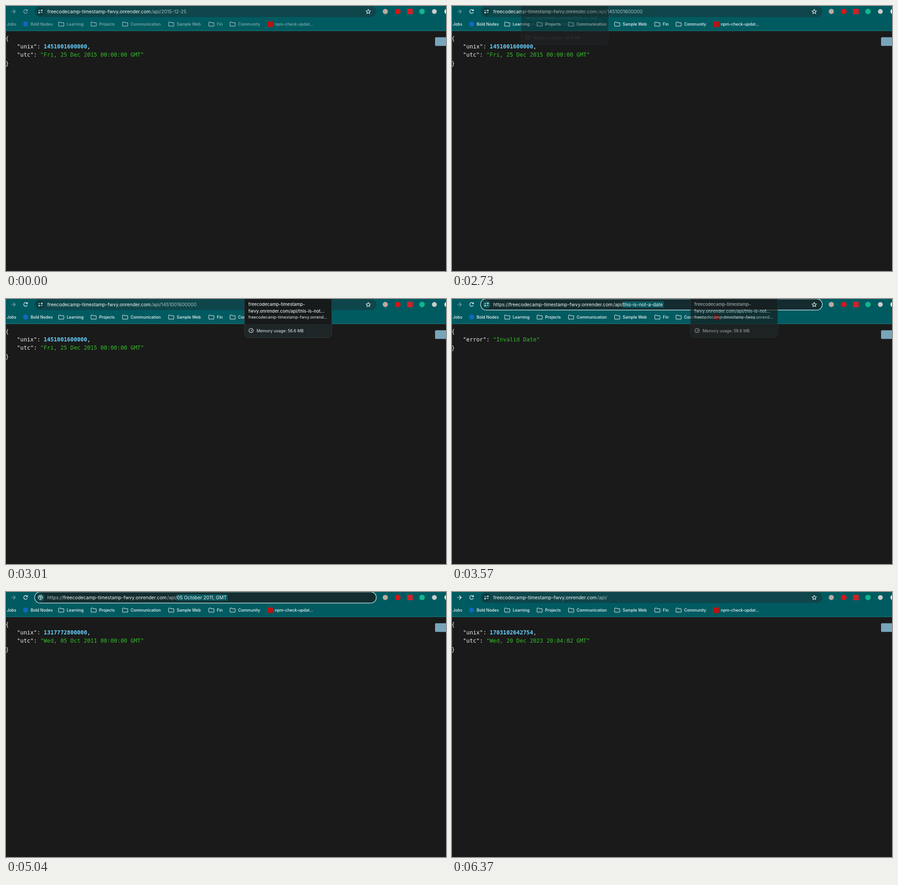
Recreate the animation shown at these times as an HTML page. Size 964x581 px, loop 8750 ms.

```html
<!DOCTYPE html>
<html lang="en">
<head>
<meta charset="utf-8">
<title>Timestamp API</title>
<style>
  html, body { margin: 0; width: 100%; height: 100%; overflow: hidden; background: #1a1a1a; }
  svg { display: block; }
  text { white-space: pre; font-family: Inter, sans-serif; }
  .url text { font-size: 10.35px; }
  .marks text { font-size: 8.8px; font-weight: 500; }
  .json text { font: 12.17px "DejaVu Sans Mono", monospace; fill: #f2f2f2; }
  .num { fill: #66d1ff; font-weight: bold; }
  .str { fill: #35bd2c; }
  .line { fill: none; stroke: currentColor; stroke-width: 1.2; stroke-linecap: round; stroke-linejoin: round; }
</style>
</head>
<body>
<svg id="stage" width="964" height="581" viewBox="0 0 964 581">
  <rect width="964" height="581" fill="#1a1a1a"/>
  <rect width="964" height="55" fill="#005b61"/>
  <path d="M0 54.5H964" stroke="#1b757a"/>
  <path id="forward" class="line" d="M12 12h8M16.3 8l4 4-4 4"/>
  <path id="reload" class="line" d="M46.6 14a4.1 4.1 0 1 1-.4-4.6M47 7.6v2.8h-2.8"/>
  <rect id="box" x="62.8" y="-.3" width="748.4" height="24.6" rx="12.3" stroke-width="1.5"/>
  <circle id="siteDisc" cx="75.5" cy="12" r="8.7"/>
  <g class="line" color="#e4eeee">
    <path id="tune" d="M71.5 9.7h2.7M76.8 14.4h2.8M77.2 9.7a1.3 1.3 0 1 0 2.6 0a1.3 1.3 0 1 0-2.6 0M71.3 14.4a1.3 1.3 0 1 0 2.6 0a1.3 1.3 0 1 0-2.6 0"/>
    <path id="globe" d="M71 12a4.5 4.5 0 1 0 9 0a4.5 4.5 0 1 0-9 0M72 9.5l3 2.2 1.2 2-.9 2.4M76.2 8l-.3 2 2 1.5 1.8-.2"/>
    <path id="star" d="M793.7 7.2l1.4 3.3 3.6.3-2.7 2.4.8 3.5-3.1-1.9-3.1 1.9.8-3.5-2.7-2.4 3.6-.3z"/>
  </g>
  <g id="url" class="url"></g>
  <circle cx="831" cy="12" r="5.7" fill="#b7aaa0"/>
  <circle cx="858.5" cy="12" r="6" fill="#dc1414"/>
  <rect x="879" y="6" width="12" height="12" fill="#d61f26"/>
  <circle cx="911.5" cy="12" r="6" fill="#12b58c"/>
  <circle cx="938.5" cy="12" r="5.3" fill="#c9cccc"/>
  <circle cx="966" cy="12" r="5.5" fill="#e2e6e6"/>
  <g id="marks" class="marks"></g>
  <rect x="940" y="68.5" width="30" height="19" rx="2" fill="#78a5ba"/>
  <g id="json" class="json"></g>
  <g id="card">
    <rect x=".5" y="-10" width="191" height="94.5" rx="7" fill="#171a1b" stroke="#30393b"/>
    <path d="M1 55H191V77.5a6.5 6.5 0 0 1-6.5 6.5H7.5A6.5 6.5 0 0 1 1 77.5z" fill="#1f2628"/>
    <g id="cardText" fill="#e6eaea">
      <g font-size="9.6" font-weight="500">
        <text x="9" y="15">freecodecamp-timestamp-</text>
        <text x="9" y="29.5">fwvy.onrender.com/api/this-is-not...</text>
      </g>
      <text x="9" y="43" font-size="8.85">freecodecamp-timestamp-fwvy.onrend...</text>
      <path class="line" color="#d5dada" d="M12.4 73.2a4.7 4.7 0 1 1 5.2 0zM14.8 70.2l2.4-2.6"/>
      <text x="27" y="72.7" font-size="8.95">Memory usage: 56.6 MB</text>
    </g>
  </g>
</svg>
<script>
const LOOP = 8750, STEP = 70;
const $ = id => document.getElementById(id);
const show = (id, on) => $(id).setAttribute('visibility', on ? 'visible' : 'hidden');
const attr = (id, name, value) => $(id).setAttribute(name, value);
const text = (x, y, s, fill) => `<text x="${x}" y="${y}" fill="${fill}">${s}</text>`;

const HOST = 'freecodecamp-timestamp-fwvy.onrender.com';
const CHRISTMAS = [1451001600000, 'Fri, 25 Dec 2015 00:00:00 GMT'];
const scenes = [
  { at: 0, path: '2015-12-25', data: CHRISTMAS, inactive: true },
  { at: 1960, path: '1451001600000', data: CHRISTMAS },
  { at: 3570, path: 'this-is-not-a-date', error: 'Invalid Date', selection: 90, scheme: '#e6efef' },
  { at: 5040, path: '05 October 2011, GMT', data: [1317772800000, 'Wed, 05 Oct 2011 00:00:00 GMT'],
    selection: 112, scheme: '#b4c5c6', globe: true },
  { at: 6230, path: '', data: [1703102642754, 'Wed, 20 Dec 2023 20:04:02 GMT'], forward: true }
];
const bookmarks = [['Jobs', 2], ['Bold Nodes', 54], ['Learning', 133], ['Projects', 204], ['Communication', 273],
  ['Sample Web', 374], ['Fin', 462], ['Community', 508.5], ['npm-check-updat...', 589]];

function drawUrl({ path, selection, scheme }) {
  const white = '#f3f8f8', grey = '#a5bfc1';
  $('url').innerHTML = selection
    ? `<rect x="374" y="5" width="${selection}" height="14" fill="#07575d"/>` +
      text(90.5, 16, 'https://', scheme) + text(125.5, 16, HOST, white) +
      text(353, 16, '/api/', scheme) + text(374.5, 16, path, white)
    : text(90.5, 16, HOST, white) + text(318, 16, '/api/', grey) + text(340, 16, path, grey);
}

function drawBookmarks(inactive) {
  const ink = inactive ? '#84aeb1' : '#f0f6f6';
  const folder = x => `<path class="line" color="${inactive ? '#a3c0c2' : '#c6d5d6'}"
    d="M${x} 36.2q0-.9.9-.9h3l1.4 1.4h5.2q.9 0 .9.9v5.6q0 .9-.9.9h-9.6q-.9 0-.9-.9z"/>`;
  $('marks').innerHTML = '<circle cx="43" cy="39.5" r="5.5" fill="#0f68bd"/>' +
    '<rect x="573" y="34" width="12" height="12" fill="#b81414"/>' +
    bookmarks.map(([name, x], i) => text(x, 42.7, name, ink) + (i > 1 && i < 8 ? folder(x - 17.7) : '')).join('');
}

function drawJson({ data, error }) {
  const string = s => `<tspan class="str">"${s}"</tspan>`;
  const rows = error
    ? [`"error": ${string(error)}`]
    : [`"unix": <tspan class="num">${data[0]}</tspan>,`, `"utc": ${string(data[1])}`];
  const end = 93 + 18.3 * rows.length;
  $('json').innerHTML = text(-1, 75, '{', '') + text(-1, end, '}', '') +
    `<path d="M1.5 79V${end - 12}" stroke="#343434" stroke-dasharray="1 1"/>` +
    rows.map((row, i) => text(24, 93 + 18.2 * i, row, '')).join('');
}

function drawScene(scene) {
  const focused = !!scene.selection;
  drawUrl(scene);
  drawBookmarks(scene.inactive);
  drawJson(scene);
  attr('box', 'fill', focused ? '#142c2f' : '#0e464b');
  attr('box', 'stroke', focused ? '#a9dcdd' : 'none');
  attr('siteDisc', 'fill', focused ? '#0a565c' : '#073b40');
  attr('forward', 'color', scene.forward ? '#f0f6f6' : '#7fa9ab');
  attr('reload', 'color', scene.inactive ? '#8fb2b4' : '#f0f6f6');
  show('tune', !scene.globe);
  show('globe', scene.globe);
  show('star', !scene.globe);
}

// The hover card glides right with a strong ease-out while its text fades in.
function drawCard(t) {
  const p = Math.min(1, (t - 2730) / 280);
  const visible = t >= 2730 && t < 3710;
  show('card', visible);
  if (!visible) return;
  const fadeOut = t < 3570 ? 1 : (3710 - t) / 210;
  attr('card', 'transform', `translate(${522 - 371 * (1 - p) ** 5.33} 0)`);
  attr('card', 'opacity', Math.min(1, 0.4 + p * 1.8) * fadeOut);
  attr('cardText', 'opacity', Math.min(1, 0.25 + p));
}

let current;
function frame(now) {
  const t = Math.floor((now % LOOP) / STEP) * STEP;
  const scene = scenes.findLast(s => t >= s.at);
  if (scene !== current) drawScene(current = scene);
  drawCard(t);
  requestAnimationFrame(() => frame(performance.now()));
}
frame(performance.now());
</script>
</body>
</html>
```
